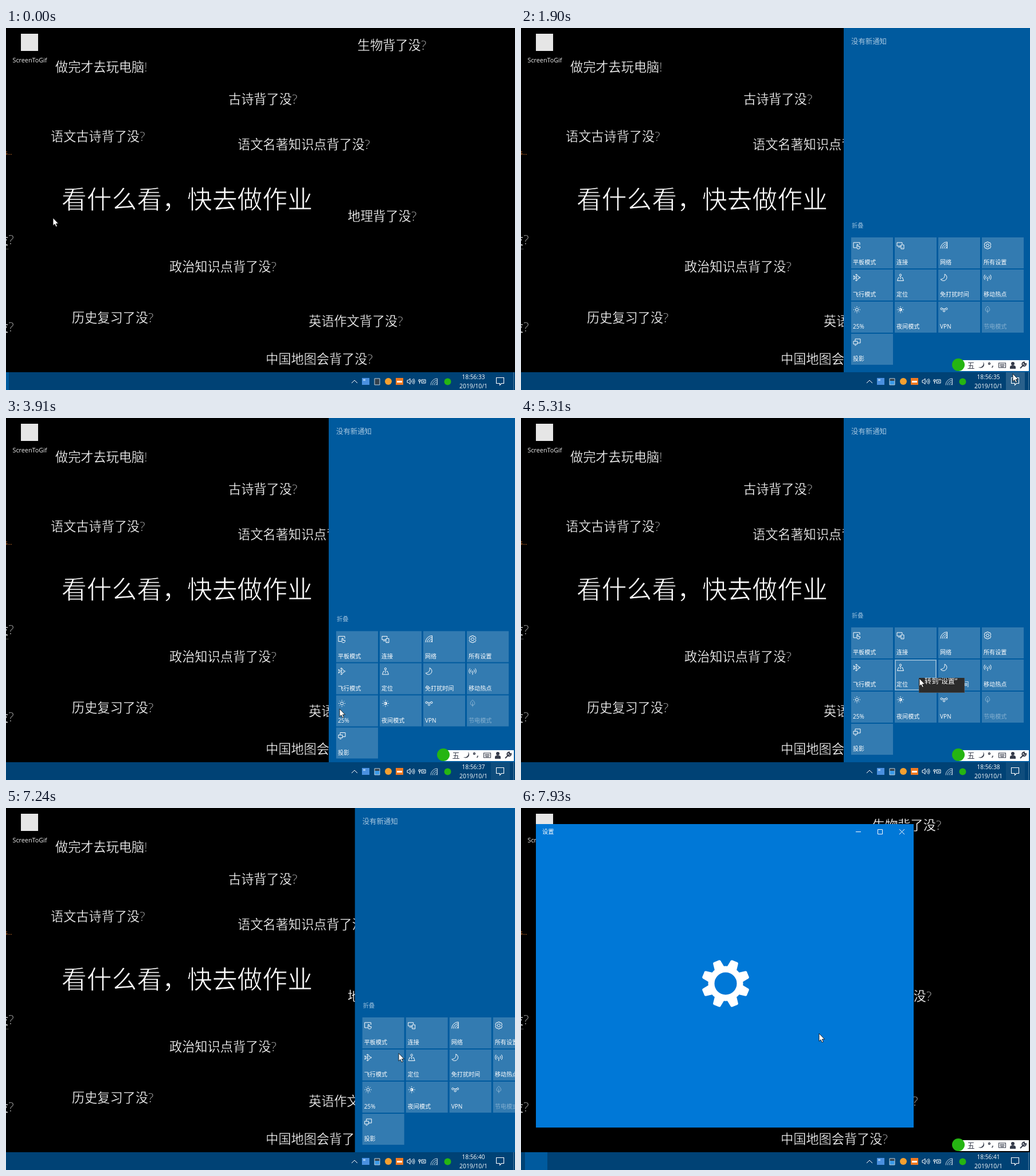
An HTML page with a canvas that plays this animation: 888x631 px, repeating every 8000 ms.

```html
<!DOCTYPE html>
<html lang="zh-CN">
<head>
<meta charset="utf-8">
<title>Desktop</title>
<style>
html, body { margin: 0; width: 100%; height: 100%; overflow: hidden; background: #000; }
canvas { display: block; }
</style>
</head>
<body>
<canvas id="stage" width="888" height="631"></canvas>
<script>
const ctx = document.getElementById('stage').getContext('2d');
const LOOP = 8000;
const FONT = "'Open Sans','Noto Sans CJK SC','Noto Sans CJK',sans-serif";
const PANEL_W = 325, COLLAPSED = 168;

const notes = [
  ['做完才去玩电脑!', 86, 68], ['生物背了没?', 613, 30], ['古诗背了没?', 388, 124],
  ['语文古诗背了没?', 78, 189], ['语文名著知识点背了没?', 404, 203], ['地理背了没?', 596, 328],
  ['政治知识点背了没?', 285, 416], ['历史复习了没?', 115, 505], ['英语作文背了没?', 528, 511],
  ['中国地图会背了没?', 453, 577], ['没?', -18, 369], ['没?', -18, 521]
];

const rays = 'M0-6V-4.5M0 6V4.5M-6 0H-4.5M6 0H4.5M-4.2-4.2L-3.2-3.2M4.2 4.2L3.2 3.2M-4.2 4.2L-3.2 3.2M4.2-4.2L3.2-3.2';
const disc = 'M-2.5 0A2.5 2.5 0 1 1 2.5 0A2.5 2.5 0 1 1-2.5 0';
// Label and line icon (centred on 0,0) of each quick action.
const tiles = [
  ['平板模式', 'M-1 4H-6V-5H5V-1M0 5V-1.5H2V2H5.5V4L4 6H1Z'],
  ['连接', 'M1 1H-6V-5H3V-2M-4 3H0M1-1H6V6H1ZM3 4H4'],
  ['网络', 'M-6 5.5A11.5 11.5 0 0 1 5.5-6M-3 5.5A8.5 8.5 0 0 1 5.5-3M0 5.5A5.5 5.5 0 0 1 5.5 0M3 5.5A2.5 2.5 0 0 1 5.5 3M5.5-6V5.5'],
  ['所有设置', 'M-1.5-6H1.5L2-4.4L4.2-5L5.8-2L4.7 0L5.8 2L4.2 5L2 4.4L1.5 6H-1.5L-2 4.4L-4.2 5L-5.8 2L-4.7 0L-5.8-2L-4.2-5L-2-4.4Z' + disc],
  ['飞行模式', 'M-6-3L-4.5 0L-6 3H-5L-3 1H0L-2 5.5H0L3 1H5L6 0L5-1H3L0-5.5H-2L0-1H-3L-5-3Z'],
  ['定位', 'M-1.7-4.3A1.7 1.7 0 1 1 1.7-4.3A1.7 1.7 0 1 1-1.7-4.3M0-2.5V3M-2 0H-3.5L-5.5 5.5H5.5L3.5 0H2'],
  ['免打扰时间', 'M1-6A6 6 0 1 1-6 3A7 7 0 0 0 1-6Z'],
  ['移动热点', 'M-4.5-5A7 7 0 0 0-4.5 4M4.5-5A7 7 0 0 1 4.5 4M-2.5-3A4 4 0 0 0-2.5 2M2.5-3A4 4 0 0 1 2.5 2M0-1V6'],
  ['25%', disc + rays],
  ['夜间模式', disc + rays + 'M0-2.5V2.5M1-2V2M1.8-1.5V1.5'],
  ['VPN', 'M-6-1.5A1.7 1.7 0 1 1-2.6-1.5A1.7 1.7 0 1 1-6-1.5M2.6-1.5A1.7 1.7 0 1 1 6-1.5A1.7 1.7 0 1 1 2.6-1.5M-1.7 2A1.7 1.7 0 1 1 1.7 2A1.7 1.7 0 1 1-1.7 2M-2.6-1.5H2.6'],
  ['节电模式', 'M0 6V-2M0 3C-5 3-5-2 0-6C5-2 5 3 0 3'],
  ['投影', 'M-3-1V-5H6V2H1M-6-1H1V4H-6ZM-4 6H-1']
].map(([name, d], i) => ({
  name, icon: new Path2D(d), x: 576 + i % 4 * 76, y: 365 + Math.floor(i / 4) * 56
}));

// Pointer stops: time, x, y.
const route = [
  [0, 82, 331], [590, 857, 605], [700, 857, 605], [760, 858, 602], [880, 858, 602],
  [990, 858, 611], [1750, 858, 611], [1930, 858, 602], [2320, 583, 341], [2600, 583, 341],
  [2760, 596, 353], [2800, 596, 353], [3200, 564, 504], [3500, 582, 507], [4190, 582, 507],
  [4950, 620, 386], [5030, 620, 386], [5240, 695, 454], [5870, 695, 454], [6010, 735, 450],
  [6110, 735, 450], [6340, 785, 434], [6480, 785, 434], [6680, 797, 453], [7050, 797, 453],
  [7390, 608, 410], [7860, 524, 397], [7930, 520, 393], [8000, 520, 393]
];

const progress = (t, start, length) => Math.min(1, Math.max(0, (t - start) / length));
const easeOut = (p, power) => 1 - (1 - p) ** power;
const between = (t, a, b) => t >= a && t < b;

function pointerAt(t) {
  const i = route.findIndex(stop => stop[0] > t);
  const [t0, x0, y0] = route[i - 1], [t1, x1, y1] = route[i];
  const p = (t - t0) / (t1 - t0), s = p * p * (3 - 2 * p);
  return [x0 + (x1 - x0) * s, y0 + (y1 - y0) * s];
}

function rect(color, x, y, w, h) {
  ctx.fillStyle = color;
  ctx.fillRect(x, y, w, h);
}

function circle(color, x, y, r) {
  ctx.fillStyle = color;
  ctx.beginPath();
  ctx.arc(x, y, r, 0, 7);
  ctx.fill();
}

// Text placed by its left edge (or centre) and vertical middle.
function text(str, x, midY, size, color = '#fff', weight = 400, align = 'left') {
  ctx.font = `${weight} ${size}px ${FONT}`;
  ctx.textAlign = align;
  ctx.fillStyle = color;
  ctx.fillText(str, x, midY + size * 0.38);
}

// Shaves the glyph edges for hairline lettering on black.
function thinText(str, x, midY, size, shave) {
  text(str, x, midY, size, '#fff', 300);
  ctx.strokeStyle = '#000';
  ctx.lineWidth = shave;
  ctx.strokeText(str, x, midY + size * 0.38);
}

function line(path, x, y, color = '#fff', width = 1) {
  ctx.save();
  ctx.translate(x, y);
  ctx.strokeStyle = color;
  ctx.lineWidth = width;
  ctx.stroke(typeof path === 'string' ? new Path2D(path) : path);
  ctx.restore();
}

function shape(d, x, y, color) {
  ctx.save();
  ctx.translate(x, y);
  ctx.fillStyle = color;
  ctx.fill(new Path2D(d));
  ctx.restore();
}

function drawDesktop() {
  rect('#000', 0, 0, 888, 631);
  notes.forEach(([str, x, y]) => thinText(str, x, y, 22.2, 0.3));
  thinText('看什么看，快去做作业', 97, 298, 43.8, 0.8);
  rect('#e6e6e6', 26, 10, 30, 30);
  text('ScreenToGif', 41.5, 55.5, 10.8, '#eee', 400, 'center');
  text('s...', -2, 217, 10, '#e0782a');
  text('..', -1, 382, 10, '#aaa');
}

function drawGear(x, y) {
  ctx.save();
  ctx.translate(x, y);
  ctx.strokeStyle = '#fff';
  ctx.lineWidth = 11;
  ctx.beginPath();
  ctx.arc(0, 0, 25, 0, 7);
  ctx.stroke();
  ctx.rotate(Math.PI / 8);
  for (let i = 0; i < 8; i++) {
    shape('M-9-27L-7-40Q-6.5-42-5-42H5Q6.5-42 7-40L9-27Z', 0, 0, '#fff');
    ctx.rotate(Math.PI / 4);
  }
  ctx.restore();
}

function drawSettings(t) {
  const start = 7260;
  if (t < start) return;
  const scale = 1 - 0.1 * (1 - progress(t, start, 250)) ** 3.5;
  ctx.save();
  ctx.globalAlpha = progress(t, start, 150);
  ctx.save();
  ctx.translate(355.5, 292.5);
  ctx.scale(scale, scale);
  ctx.translate(-355.5, -292.5);
  rect('#0078d7', 26, 28, 659, 529);
  text('设置', 37, 41, 10.2);
  line('M584 41.5H593M622.5 37.5H630.5V45.5H622.5ZM660 37L669 46M669 37L660 46', 0, 0);
  ctx.restore();
  drawGear(357, 306);
  ctx.restore();
}

function drawPanel(t, pointer) {
  const slide = t < 7130
    ? PANEL_W * (1 - easeOut(progress(t, 1085, 900), 5))
    : PANEL_W * progress(t, 7130, 296) ** 2;
  if (slide >= PANEL_W) return;
  const expanding = t >= 3620;
  const drop = COLLAPSED * (expanding
    ? 1 - easeOut(progress(t, 3620, 440), 3)
    : easeOut(progress(t, 2400, 500), 3));
  const hovering = between(t, 4230, 6560);

  ctx.save();
  ctx.beginPath();
  ctx.rect(0, 0, 888, 600);
  ctx.clip();
  ctx.translate(slide, 0);
  rect('#005a9e', 563, 0, PANEL_W, 600);
  text('没有新通知', 576, 23, 12.4, '#a9c8e1', 500);
  ctx.translate(0, drop);
  text(between(t, 2400, 3620) ? '展开' : '折叠', 577, 344, 10.2, '#9cc0dd');
  for (const { name, icon, x, y } of tiles) {
    if (drop > 167.5 && y > 365) continue;
    rect('#337bb1', x, y, 73, 54);
    ctx.globalAlpha = name === '节电模式' ? 0.4 : 1;
    line(icon, x + 10, y + 14);
    text(name, x + 3, y + 43.5, 10.1);
    ctx.globalAlpha = 1;
    if (hovering && between(pointer[0], x, x + 73) && between(pointer[1], y, y + 54)) {
      ctx.strokeStyle = '#85b0d0';
      ctx.lineWidth = 2;
      ctx.strokeRect(x + 1, y + 1, 71, 52);
    }
  }
  ctx.restore();
}

function drawMenu(t, start, end, x, y, hoverFrom) {
  if (!between(t, start, end)) return;
  const height = 20 + 20 * easeOut(progress(t, start, 250), 2);
  ctx.save();
  ctx.beginPath();
  ctx.rect(x, y, 80, height);
  ctx.clip();
  ctx.translate(x, y + height - 40);
  rect('#2b2b2b', 0, 0, 80, 40);
  if (t >= hoverFrom) rect('#414141', 0, 6, 80, 28);
  ctx.strokeStyle = '#4a4a4a';
  ctx.lineWidth = 1;
  ctx.strokeRect(0.5, 0.5, 79, 39);
  text('转到“设置”', 10, 19.5, 12.2);
  ctx.restore();
}

function drawTaskbar(t) {
  rect('#004275', 0, 600, 888, 31);
  if (t < 1130) rect('#005a9e', 0, 600, 5, 31);
  if (t >= 7450) rect('#005a9e', 7, 600, 39, 31);
  if (between(t, 900, 7130)) {
    rect(`rgba(255,255,255,${t < 1930 ? 0.16 : 0.06})`, 846, 600, 33, 31);
  }
  rect('#4c7b9e', 885, 600, 1, 31);

  line('M-5 3L0-2L5 3', 608, 616);
  rect('#4a90e0', 621, 610, 13, 12);
  rect('#9cc8f4', 623, 612, 4, 3);
  rect(t < 1900 ? '#31404d' : '#3a9ae8', 643, 611, 9, 11);
  if (t >= 1900) rect('#31404d', 643, 611, 9, 4);
  line('M-4.5-5.5H4.5V5.5H-4.5Z', 647.5, 616.5, '#c5d3de');
  circle('#f5a030', 667, 616, 6);
  rect('#f07a22', 680, 610, 13, 12);
  rect('#fff', 682, 615, 9, 3);
  line('M-6-2H-4L-1-5V5L-4 2H-6ZM1-2A3 3 0 0 1 1 2M3-4A6 6 0 0 1 3 4M5-5A8 8 0 0 1 5 5', 706, 616);
  line('M-6-3H-3V0H-6ZM-4.5 0V4M-1-3H6V3H-1ZM1-1.5L4 1.5M4-1.5L1 1.5', 726, 616);
  line(tiles[2].icon, 747, 617, '#d5e2ec', 0.9);
  circle('#25b512', 770.5, 616.5, 6);

  const seconds = 33 + Math.floor((t + 520) / 1000);
  text('18:56:' + seconds, 815.5, 608, 10.1, '#fff', 400, 'center');
  text('2019/10/1', 815.5, 624, 10.3, '#fff', 400, 'center');
  line('M-6.5-5.5H6.5V4.5H2.5L-.5 7.5V4.5H-6.5Z', 862, 615, '#fff', 1.1);
}

function drawInputBar(t) {
  if (!between(t, 1500, 7100) && t < 7600) return;
  const ink = '#353b4a';
  rect('#fff', 764, 579, 122, 19);
  circle('#25b512', 763, 587, 11);
  text('五', 778.5, 588, 13, ink);
  shape('M2-6A6 6 0 1 1-6 3A6.5 6.5 0 0 0 2-6Z', 804, 588, ink);
  line('M-4.5-2A1.5 1.5 0 1 1-1.5-2A1.5 1.5 0 1 1-4.5-2M3 1.5V3L1.5 5', 820, 587, ink, 1.4);
  line('M-6-4H6V4H-6ZM-4-1.5H4M-4 .5H4M-3 2.5H3', 839.5, 588, ink, 1.1);
  circle(ink, 858, 585, 3);
  shape('M-5 6V3Q-5 0 0 0Q5 0 5 3V6Z', 858, 588, ink);
  line('M-5 5L1-1M5-3A3.4 3.4 0 1 1 2-5.5L2-2Z', 876, 588, ink, 2);
}

function drawPointer([x, y]) {
  const arrow = 'M0 0V13.5L3-.0L3 10.8L5.2 15.5L7.4 14.5L5.3 10H9.5Z'.replace('L3-.0', '');
  shape(arrow, x, y, '#fff');
  line(arrow, x, y, '#000', 0.8);
}

function draw(t) {
  const pointer = pointerAt(t);
  drawDesktop();
  drawSettings(t);
  drawPanel(t, pointer);
  drawMenu(t, 5270, 5920, 694, 453, Infinity);
  drawMenu(t, 6380, 6900, 785, 434, 6600);
  drawTaskbar(t);
  drawInputBar(t);
  drawPointer(pointer);
}

const began = performance.now();
function tick() {
  draw((performance.now() - began) % LOOP);
  requestAnimationFrame(tick);
}
tick();
</script>
</body>
</html>
```
